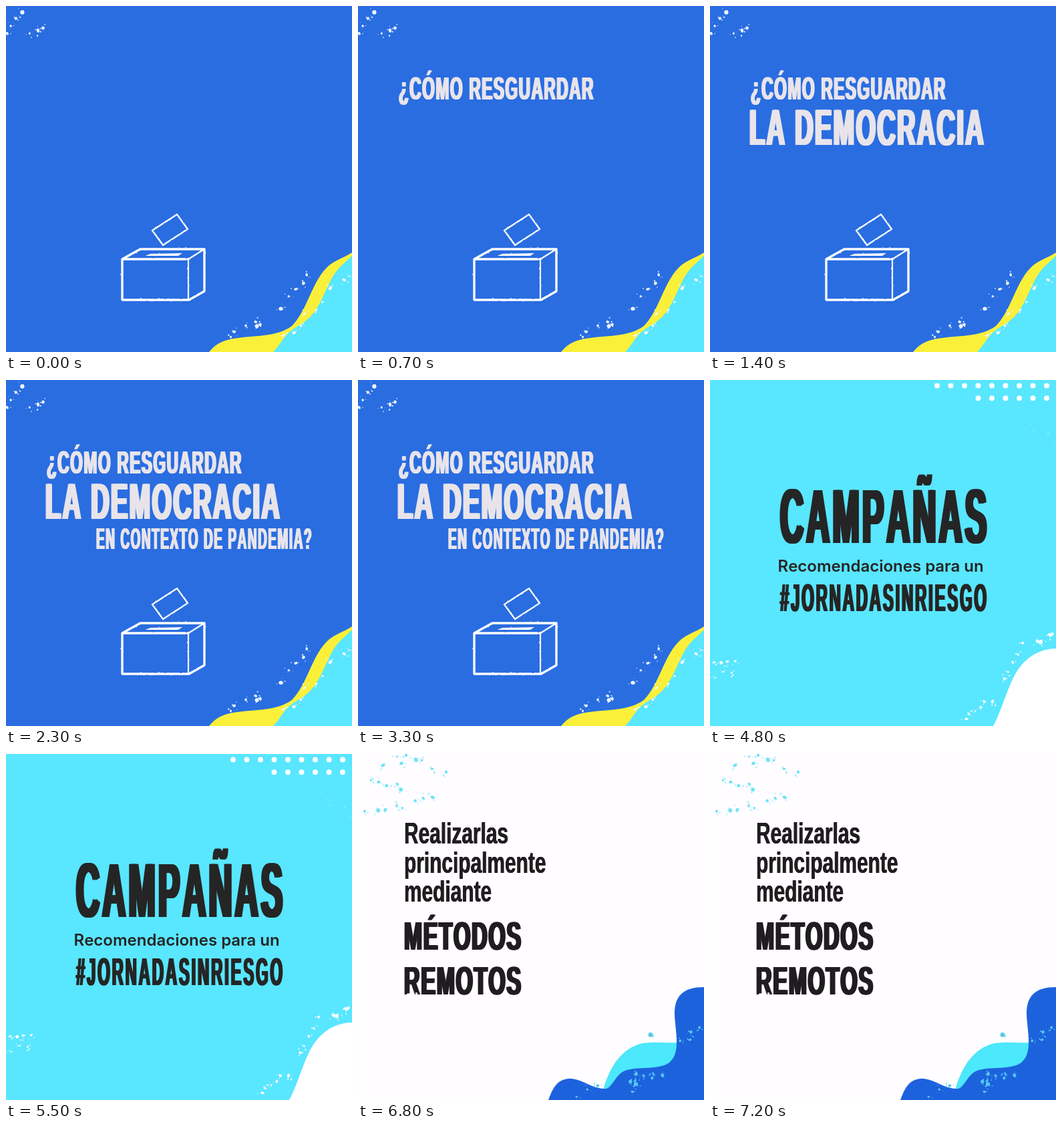
Recreate the animation shown at these times as an HTML page. Size 518 by 518 pixels, loop 8000 ms.

```html
<!DOCTYPE html>
<html lang="es">
<head>
<meta charset="utf-8">
<title>Recomendaciones</title>
<style>
html, body { margin: 0; width: 100%; height: 100%; overflow: hidden; }
.scene { position: absolute; left: 0; top: 0; width: 518px; height: 518px; overflow: hidden; opacity: 0; }
.scene svg { position: absolute; left: 0; top: 0; }
#vote { background: #296de1; color: #e8e4ea; opacity: 1; }
#title { background: #59e6ff; color: #252525; }
#advice { background: #fffdff; color: #201d20; }

/* --x left edge, --y baseline, --s size, --b baseline within the line box */
p {
  --b: .8465;
  position: absolute; margin: 0; white-space: pre;
  left: calc(var(--x) * 1px);
  top: calc((var(--y) - var(--b) * var(--s)) * 1px);
  font: 700 calc(var(--s) * 1px)/1 "Liberation Sans", Arial, sans-serif;
  font-kerning: none;
  transform-origin: 0 0;
}
.heavy, .slim { text-shadow: .05em 0, -.05em 0; }
.heavy { transform: scaleX(.5); letter-spacing: .065em; }
.slim { transform: scaleX(.42); letter-spacing: .085em; }
.black { transform: scaleX(.545); letter-spacing: .056em; }
.tag { letter-spacing: .12em; }
.body { transform: scaleX(.685); text-shadow: .012em 0, -.012em 0; }
.plain { --b: .864; font-family: Inter, "Open Sans", sans-serif; font-weight: 600; }
</style>
</head>
<body>
<section class="scene" id="vote">
  <svg width="518" height="518">
    <defs>
      <filter id="chalk" x="-10%" y="-10%" width="120%" height="120%">
        <feTurbulence type="fractalNoise" baseFrequency=".22" numOctaves="2" seed="4"/>
        <feDisplacementMap in="SourceGraphic" scale="2" xChannelSelector="R" yChannelSelector="G"/>
      </filter>
    </defs>
    <path fill="#faf03a" d="M304 518C312 508 322 501 340 498C370 493 405 496 428 479C452 455 458 410 484 388C496 379 508 376 518 369V518Z"/>
    <path fill="#59e6ff" d="M400 518C410 508 416 494 428 485C440 477 452 472 463 456C478 434 483 409 499 392C506 385 512 380 518 374V518Z"/>
    <g class="splats" fill="#eef6ff"></g>
    <g filter="url(#chalk)" fill="none" stroke="#fff" stroke-linejoin="round" stroke-linecap="round">
      <path stroke-width="3.4" d="M273 379H174V440H274L297 427V364H201L174 379"/>
      <path stroke-width="2.2" d="M297 364L273 379V440"/>
      <path stroke-width="2.3" d="M219 336L256 312L272 334L235 358Z"/>
      <path stroke="none" fill="#fff" d="M216 371L264 370L258 374L209 374Z"/>
    </g>
  </svg>
  <p class="heavy line" style="--x:61;--y:141;--s:48">¿CÓMO RESGUARDAR</p>
  <p class="heavy line" style="--x:59;--y:209;--s:75.6">LA DEMOCRACIA</p>
  <p class="slim line" style="--x:135;--y:253;--s:45">EN CONTEXTO DE PANDEMIA?</p>
</section>

<section class="scene" id="title">
  <svg width="518" height="518">
    <path fill="#fff" d="M424 518C440 488 447 452 463 431C477 412 497 402 518 402V518Z"/>
    <g class="dots" fill="#fff"></g>
    <g class="splats" fill="#effcff"></g>
    <g class="faint" fill="#74edf7"></g>
  </svg>
  <p class="slim" style="--x:105;--y:244;--s:115.5">CAMPAÑAS</p>
  <p class="plain" style="--x:101.5;--y:288;--s:24">Recomendaciones para un</p>
  <p class="slim tag" style="--x:105;--y:346.5;--s:56.7">#JORNADASINRIESGO</p>
</section>

<section class="scene" id="advice">
  <svg width="518" height="518">
    <path fill="#4ce8fb" d="M367 503C378 465 396 440 426 433C445 430 462 433 477 432L480 470L372 512Z"/>
    <path fill="#1d62dd" d="M285 518C292 499 299 486 318 486C338 487 347 500 368 501C380 504 384 480 400 474C420 467 455 474 468 460C484 444 474 410 474 388C474 360 490 349 518 349V518Z"/>
    <g class="splats" fill="#6fe3f8"></g>
    <g class="low" fill="#55c9ef"></g>
  </svg>
  <p class="body" style="--x:69;--y:135;--s:43.6">Realizarlas</p>
  <p class="body" style="--x:69;--y:178.5;--s:43.6">principalmente</p>
  <p class="body" style="--x:69;--y:222;--s:43.6">mediante</p>
  <p class="heavy black" style="--x:69;--y:293;--s:59.6">MÉTODOS</p>
  <p class="heavy black" style="--x:69;--y:360;--s:59.6">REMOTOS</p>
  <svg width="518" height="518" fill="#fffdff">
    <ellipse cx="75.5" cy="359.5" rx="2.5" ry="1.2"/>
    <ellipse cx="87.5" cy="358.5" rx="1.8" ry="1.5"/>
  </svg>
</section>

<script>
const LOOP = 8000;
const $ = s => document.querySelector(s);

function random(seed) {
  return () => (seed = (seed * 16807) % 2147483647) / 2147483647;
}

function blob(group, x, y, rx, ry = rx, turn = 0) {
  const e = document.createElementNS("http://www.w3.org/2000/svg", "ellipse");
  const at = { cx: x, cy: y, rx, ry, transform: `rotate(${turn} ${x} ${y})` };
  for (const k in at) e.setAttribute(k, at[k]);
  group.append(e);
}

// Paint drops with small specks, strewn evenly from one point to another.
function splats(selector, [x1, y1], [x2, y2], count, spread, size = 2.6) {
  const group = $(selector), rnd = random(x1 * 31 + y2 * 7 + 1);
  const jitter = () => spread * (rnd() + rnd() - 1);
  for (let i = 0; i < count; i++) {
    const t = (i + .5) / count;
    const x = x1 + (x2 - x1) * t + jitter(), y = y1 + (y2 - y1) * t + jitter();
    const r = size * (.6 + .7 * rnd());
    blob(group, x, y, r, r * (.6 + .4 * rnd()), 180 * rnd());
    for (let n = 0; n < 3; n++) {
      const a = 2 * Math.PI * rnd(), d = r + 5 * rnd();
      blob(group, x + d * Math.cos(a), y + d * Math.sin(a), .4 + .8 * rnd());
    }
  }
}

splats("#vote .splats", [0, 45], [24, 4], 4, 6);
splats("#vote .splats", [34, 40], [62, 33], 3, 4);
splats("#vote .splats", [334, 492], [390, 472], 6, 10);
splats("#vote .splats", [412, 456], [456, 392], 5, 6);
splats("#vote .splats", [412, 502], [518, 398], 9, 8);

splats("#title .splats", [2, 420], [40, 422], 4, 6);
splats("#title .splats", [0, 446], [40, 434], 3, 5, 1.8);
splats("#title .splats", [380, 510], [424, 476], 6, 6);
splats("#title .splats", [440, 456], [470, 390], 5, 5, 2);
splats("#title .splats", [486, 398], [518, 378], 4, 5);
splats("#title .faint", [466, 46], [516, 90], 5, 14, 1.6);

splats("#advice .splats", [36, 12], [134, 16], 8, 14, 3);
splats("#advice .splats", [14, 36], [72, 54], 5, 8, 3);
splats("#advice .splats", [8, 84], [120, 68], 8, 8, 2.8);
splats("#advice .low", [404, 502], [450, 474], 10, 18);
splats("#advice .low", [320, 514], [368, 496], 3, 4, 2);
splats("#advice .low", [484, 434], [510, 410], 4, 8);
splats("#advice .low", [438, 420], [438, 420], 1, 1, 3);

for (let row = 0; row < 2; row++)
  for (let n = row * 3; n < 9; n++)
    blob($("#title .dots"), 340 + 20.5 * n, 8.5 + 18.8 * row, 4);

// Steps are [time, opacity]; repeated times make hard cuts.
function play(el, steps) {
  el.animate(
    steps.map(([t, opacity]) => ({ offset: t / LOOP, opacity })),
    { duration: LOOP, iterations: Infinity }
  );
}

function show(id, from, to) {
  const steps = [[0, from ? 0 : 1]];
  if (from) steps.push([from, 0], [from, 1]);
  if (to < LOOP) steps.push([to, 1], [to, 0]);
  play($(id), [...steps, [LOOP, to < LOOP ? 0 : 1]]);
}

show("#vote", 0, 3900);
show("#title", 3900, 6800);
show("#advice", 6800, LOOP);

document.querySelectorAll(".line").forEach((el, i) => {
  const from = 100 + 650 * i;
  play(el, [[0, 0], [from, 0], [from + 500, 1], [LOOP, 1]]);
});
</script>
</body>
</html>
```
